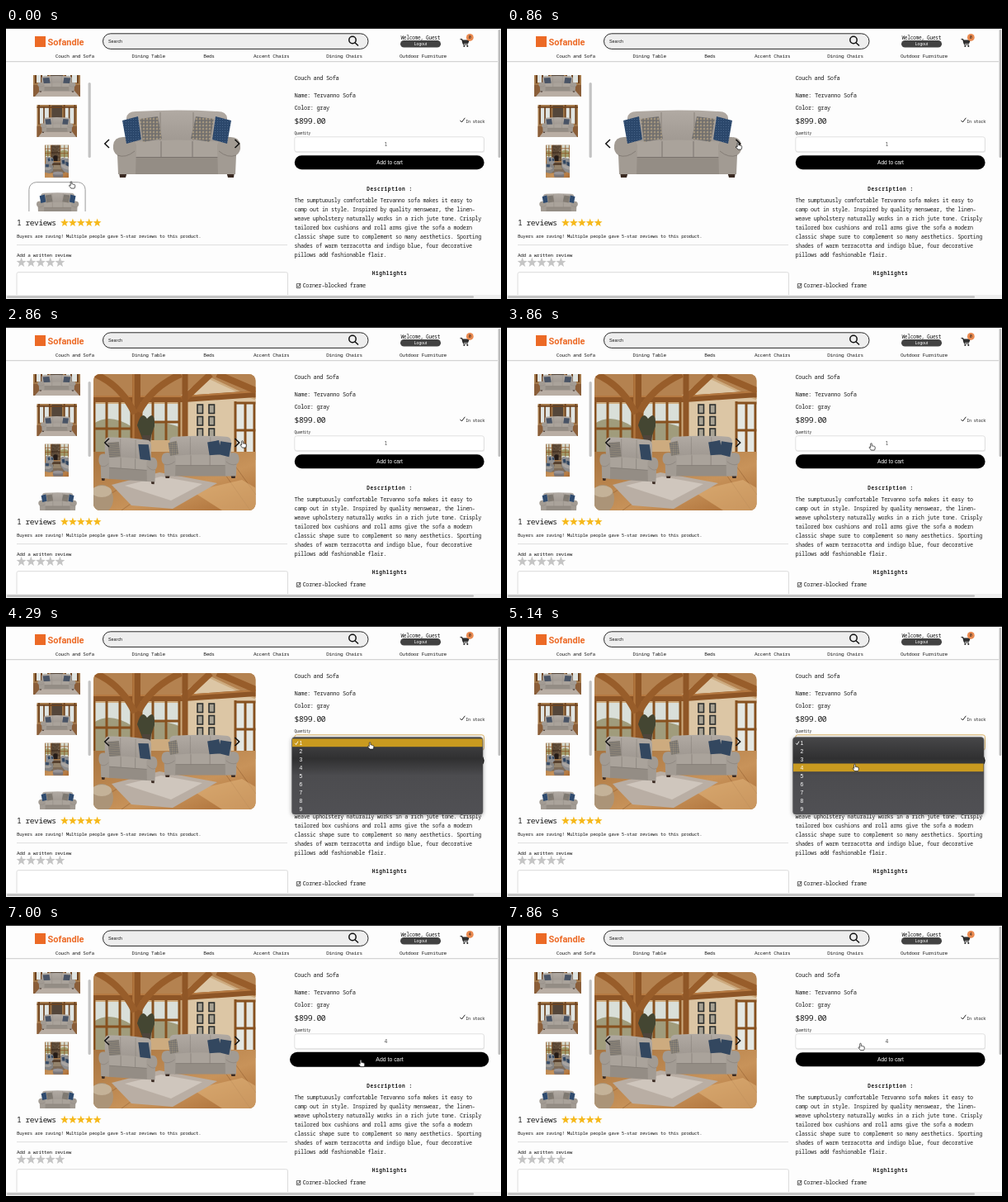
Animation of 600x328 px, one loop 8000 ms. Source, as an HTML page:

```html
<!DOCTYPE html>
<html lang="en">
<head>
<meta charset="utf-8">
<title>Furniture shop</title>
<style>
  html, body { margin: 0; width: 100%; height: 100%; overflow: hidden; background: #fdfdfd; }
  svg { display: block; width: 600px; height: 328px; }
  text { font-family: "Noto Sans Mono", "DejaVu Sans Mono", monospace; letter-spacing: -.05em; fill: #1c1c1c; }
  .ui { font-family: "Liberation Sans", Arial, sans-serif; letter-spacing: 0; }
  .head { font-weight: 600; letter-spacing: .1em; text-anchor: middle; }
  .brand { font-family: Roboto, sans-serif; font-weight: 700; letter-spacing: 0; fill: #ec6a26; }
  .light { fill: #fff; }
  #menu { filter: drop-shadow(0 1px 2.5px rgba(0, 0, 0, .35)); }
</style>
</head>
<body>
<svg id="stage" viewBox="0 0 600 328">
  <defs>
    <clipPath id="thumbClip"><rect x="26" y="57" width="74" height="165"/></clipPath>
    <clipPath id="roomClip"><rect width="196.5" height="165" rx="8"/></clipPath>
    <clipPath id="tallClip"><rect width="98.5" height="165"/></clipPath>
    <linearGradient id="menuFill" x2="0" y2="1">
      <stop offset="0" stop-color="#474749"/><stop offset=".28" stop-color="#303031"/>
      <stop offset=".5" stop-color="#4c4c4f"/><stop offset="1" stop-color="#505054"/>
    </linearGradient>
    <linearGradient id="floor" x2="1" y2="1">
      <stop offset="0" stop-color="#a8743f"/><stop offset=".6" stop-color="#c8935a"/><stop offset="1" stop-color="#a96b34"/>
    </linearGradient>
    <linearGradient id="cloth" x2="0" y2="1">
      <stop offset="0" stop-color="#b1aaa3"/><stop offset="1" stop-color="#968f88"/>
    </linearGradient>
    <pattern id="weave" width="4" height="4" patternUnits="userSpaceOnUse">
      <rect width="4" height="4" fill="#77736f"/><circle cx="2" cy="2" r="1.2" fill="#a3967f"/><circle r=".8" fill="#4c596b"/>
    </pattern>
    <pattern id="dots" width="3" height="3" patternUnits="userSpaceOnUse">
      <rect width="3" height="3" fill="#2b476b"/><circle cx="1.5" cy="1.5" r=".6" fill="#4c698d"/>
    </pattern>

    <g id="couch">
      <path d="M8 74h10l-2 7h-7zM138 74h10l-1 7h-7z" fill="#3a2a22"/>
      <path d="M17 9Q18 1 28 1Q78-2 128 1Q138 1 139 9V60H17z" fill="url(#cloth)"/>
      <path d="M58 2V38M98 2V38" stroke="#807a73" stroke-width=".8"/>
      <path d="M22 38Q78 33 134 38V58H22z" fill="#aaa39b"/>
      <path d="M26 56H130V77H26z" fill="#948d85"/>
      <path d="M26 56.5H130M59 37V56M97 37V56" stroke="#78716b" stroke-width=".9"/>
      <path d="M1 42Q2 31 15 32Q28 33 29 43L28 77H7L6 54Q0 50 1 42z" fill="#a29b93"/>
      <path d="M155 42Q154 31 141 32Q128 33 127 43L128 77H149L150 54Q156 50 155 42z" fill="#a29b93"/>
      <path d="M6 54Q16 58 27 49M150 54Q140 58 129 49" fill="none" stroke="#7e7770" stroke-width=".8"/>
    </g>
    <g id="sofa">
      <use href="#couch"/>
      <path d="M12 12L31 7L35 35L17 40z" fill="url(#dots)"/>
      <path d="M144 12L125 7L121 35L139 40z" fill="url(#dots)"/>
      <path d="M33 10L55 7L60 34L37 38z" fill="url(#weave)"/>
      <path d="M123 10L101 7L95 34L118 38z" fill="url(#weave)"/>
    </g>

    <g id="tall" clip-path="url(#tallClip)">
      <rect width="99" height="165" fill="#a87a47"/>
      <path d="M2 0H24V62H2zM65 0H99V68H65z" fill="#d5d9cd"/>
      <path d="M2 30Q12 22 24 34V56H2zM65 32Q82 18 99 36V60H65z" fill="#a09c6c"/>
      <path d="M1 0V62M13 0V60M25 0V64M64 0V66M81 0V66M97 0V66M0 20H25M64 18H99M0 42H25M64 42H99" stroke="#8e5727" stroke-width="3"/>
      <path d="M27 0H62L64 84H25z" fill="#5c4936"/>
      <g id="stones"/>
      <path d="M26 37H63V41H26z" fill="#3a2718"/>
      <path d="M35 82V57Q44 48 53 57V82z" fill="#241b17"/>
      <path d="M0 82H99V165H0z" fill="url(#floor)"/>
      <path d="M26 86H66L84 141H16z" fill="#7d6b59"/>
      <path d="M30 96H62L68 122H26z" fill="#94836c"/>
      <path d="M4 64Q5 59 12 60L29 62Q35 64 35 72L37 96L22 101L4 92z" fill="#919192"/>
      <path d="M12 68L20 65L23 80L14 83zM26 68L33 67L34 80L28 82z" fill="#354b67"/>
      <path d="M33 91H66L69 101H30z" fill="#4b3423"/><path d="M34 101V112M66 101V112" stroke="#352418" stroke-width="2"/>
      <path d="M0 95Q10 90 20 95L34 105V130L20 143L0 138z" fill="#848383"/>
      <path d="M0 112L18 110L30 117L17 127L0 125z" fill="#a39f9b"/><path d="M4 97L17 99L16 112L4 111z" fill="#364c68"/>
      <path d="M65 72Q68 62 78 65L99 71V142L80 134L66 113z" fill="#8d8d8f"/>
      <path d="M67 96L82 102L99 110V126L80 119L67 108z" fill="#a8a4a1"/>
      <path d="M70 78L81 76L84 94L73 95zM86 84L98 88V108L87 102z" fill="#324761"/>
      <path d="M36 137Q54 131 73 137L76 150L74 163H36L33 150z" fill="#79767a"/><path d="M36 137Q54 131 73 137L75 147Q54 152 34 147z" fill="#979396"/>
    </g>

    <g id="room" clip-path="url(#roomClip)">
      <rect width="197" height="165" fill="#cdab7f"/>
      <path d="M0 0H197V30L138 2L100 30H0z" fill="#b48250"/>
      <path d="M112 34L140 6L197 32V96H112z" fill="#dcc6a5"/>
      <path d="M0 36H47V98H0zM57 36H104V80H57z" fill="#d9dfd9"/>
      <path d="M0 60Q20 46 47 64V98H0zM57 62Q80 54 104 64V80H57z" fill="#a09c7c"/>
      <path d="M172 34H197V104H172z" fill="#e4e7e2"/>
      <path d="M1 34V96M16 34V96M32 34V96M46 34V96M58 36V80M72 34V80M88 34V80M104 32V82M172 33V106M184 34V104M195 34V104M0 66H47M57 58H104M172 68H197M0 97H47M172 35H197" stroke="#87511f" stroke-width="3"/>
      <path d="M0 94H197V165H0z" fill="url(#floor)"/>
      <path d="M0 158L75 111M34 165L110 110M190 165L160 122M197 146L168 106" stroke="#8a592c" stroke-width=".8" opacity=".6"/>
      <path d="M156 165L120 142L180 128L197 138V165z" fill="#e0b27b" opacity=".6"/>
      <path d="M0 30H110L197 24" fill="none" stroke="#8d5526" stroke-width="8"/>
      <path d="M0 27H110L197 21" fill="none" stroke="#b67a42" stroke-width="2"/>
      <path d="M52 0V100" stroke="#8f5626" stroke-width="10"/>
      <path d="M48.5 0V100" stroke="#b1763e" stroke-width="2.4"/>
      <path d="M2 0Q34 14 50 48M55 46Q70 16 106 0M108 32L142 0M150 0L197 20" fill="none" stroke="#985d2a" stroke-width="8"/>
      <path d="M111 0V80" stroke="#8f5626" stroke-width="7"/>
      <g id="frames"/>
      <path d="M53 62Q58 43 65 54Q75 43 74 63L68 80H60z" fill="#444632"/><path d="M59 74H70L68 92H61z" fill="#4e443b"/>
      <path d="M22 134L80 119L150 132L96 163L46 159z" fill="#b9aea4"/>
      <path d="M38 135L82 124L132 133L94 153z" fill="#cfc6bd"/>
      <g transform="translate(6 75) skewY(4) scale(.46 .66)">
        <use href="#couch"/>
        <path d="M24 11L54 8L58 35L29 38z" fill="url(#weave)"/><path d="M105 10L132 9L138 38L110 37z" fill="#33475f"/>
      </g>
      <g transform="translate(82 75) scale(.61 .63)">
        <use href="#couch"/>
        <path d="M14 13L31 9L35 35L18 38z" fill="url(#weave)"/><path d="M92 12L115 8L120 35L96 37zM118 10L140 13L135 40L114 35z" fill="#33475f"/>
      </g>
      <ellipse cx="10" cy="151" rx="14" ry="17" fill="#ab9478"/><ellipse cx="10" cy="142" rx="12" ry="7" fill="#c4b298"/>
    </g>

    <g id="lounge">
      <rect width="57" height="41" fill="#a57b4d"/>
      <path d="M4 2H17V24H4zM40 2H53V24H40z" fill="#dfe4e2"/>
      <path d="M21 1H36V22H21z" fill="#54463a"/>
      <path d="M3 0V25M10 2V24M18 0V25M39 0V25M46 2V24M54 0V25M0 3H57" stroke="#6e431f" stroke-width="2"/>
      <path d="M0 27H57V41H0z" fill="#8a5e39"/><path d="M8 34H50L56 41H2z" fill="#b9aea4"/>
      <g transform="translate(5 16) scale(.3 .24)">
        <use href="#couch"/>
        <path d="M22 10L48 8L52 36L26 38zM134 10L108 8L104 36L130 38z" fill="#485365"/>
      </g>
    </g>
  </defs>

  <rect width="600" height="328" fill="#fdfdfd"/>
  <rect width="600" height="1" fill="#222"/>
  <rect x="35" y="10" width="13" height="13" fill="#ec6a26"/>
  <rect x="117.5" y="6.8" width="321.5" height="18.6" rx="9.3" fill="#eee" stroke="#2a2a2a"/>
  <g fill="none" stroke="#111" stroke-width="1.5"><circle cx="420" cy="14.5" r="4.2"/><path d="M423 17.8L427 21.5"/></g>
  <rect x="478" y="15" width="49" height="8.6" rx="4.3" fill="#424242"/>
  <g fill="none" stroke="#222" stroke-width="1.1"><path d="M550.5 13.5H552.6L554.5 20H560"/><path d="M553.2 15H561L559.8 18.3H554.2z" fill="#333"/></g>
  <circle cx="555.3" cy="21.9" r="1" fill="#222"/><circle cx="559.3" cy="21.9" r="1" fill="#222"/>
  <circle cx="562.3" cy="11.4" r="4.4" fill="#e9894f"/>
  <path d="M0 40.7H596" stroke="#c6c6c6" stroke-width=".9"/>
  <rect x="596.6" y="2" width="2.6" height="155" rx="1.3" fill="#bcbcbc"/>

  <g clip-path="url(#thumbClip)">
    <use href="#lounge" transform="translate(33 42)"/>
    <use href="#lounge" transform="translate(37.5 93) scale(.85 .95)"/>
    <use href="#tall" transform="translate(47 141.5) scale(.294 .241)"/>
    <g id="pick">
      <rect id="pickRing" x="31" y="189" width="62" height="46" rx="8" fill="#fff" stroke="#9a9a9a" stroke-width=".9"/>
      <use href="#sofa" transform="translate(39 200.5) scale(.302 .29)"/>
    </g>
  </g>
  <rect x="99.6" y="66" width="3.2" height="91" rx="1.6" fill="#c3c3c3"/>

  <use id="view0" href="#sofa" transform="translate(129 100)"/>
  <use id="view1" href="#tall" transform="translate(155 57)"/>
  <use id="view2" href="#room" transform="translate(106 57)"/>
  <path d="M125 135L119.8 140L125 145M277.5 135L282.7 140L277.5 145" fill="none" stroke="#111" stroke-width="1.5"/>

  <path d="M13 262.6H341" stroke="#d6d6d6" stroke-width=".8"/>
  <rect x="13" y="295.7" width="328.5" height="40" rx="2" fill="#fff" stroke="#d8d8d8" stroke-width=".9"/>
  <path d="M550.5 111.8L552.4 114L556.3 108.8" fill="none" stroke="#222" stroke-width="1"/>
  <rect x="350" y="132.4" width="230" height="18.4" rx="2.5" fill="#e6e6e6"/>
  <rect id="field" x="349.8" y="131.8" width="229.6" height="18" rx="2.5" fill="#fff" stroke="#dadada" stroke-width=".8"/>
  <text id="qty" x="460.3" y="143" font-size="6.5" text-anchor="middle" style="fill:#555">1</text>
  <g id="buy">
    <rect x="349.8" y="154.2" width="229.8" height="17" rx="8.5"/>
    <text class="ui light" x="465" y="165" font-size="6.6" text-anchor="middle">Add to cart</text>
  </g>
  <path d="M352.3 309.6H356.8V314.6H352.3zM353 311.8L354.3 313.4L357 309" fill="none" stroke="#222" stroke-width=".7"/>
  <g id="copy"/>
  <text id="count" x="562.3" y="13.3" font-size="5.2" text-anchor="middle">0</text>
  <rect y="323" width="600" height="5" fill="#efefef"/>
  <rect x="1" y="324.2" width="566" height="2.5" rx="1.2" fill="#bdbdbd"/>

  <g id="menu">
    <rect x="346.5" y="134.5" width="231.5" height="93.5" rx="3.5" fill="url(#menuFill)" stroke="#666" stroke-width=".5"/>
    <rect id="bar" x="347" width="230.5" height="9.7" fill="#c99a1f"/>
    <path d="M350.3 141.8L351.6 143.6L354 139.6" fill="none" stroke="#fff" stroke-width=".9"/>
    <g id="options"/>
  </g>

  <path id="hand" d="M-.9 .8Q-.9 -.3 0 -.3T.9 .8V3.2Q1.8 2.6 2.4 3.5Q3.3 3 3.9 3.9Q5 3.6 5.1 4.8V6.4Q5 7.7 4.2 8.8H-.1Q-1 7.5 -2.6 5.6Q-2.9 4.5 -1.7 4.6L-.9 5.3z" fill="#fff" stroke="#111" stroke-width=".75"/>
</svg>
<script>
const $ = id => document.getElementById(id);

function add(parent, tag, attrs, text) {
  const el = document.createElementNS('http://www.w3.org/2000/svg', tag);
  for (const k in attrs) el.setAttribute(k, attrs[k]);
  if (text) el.textContent = text;
  parent.append(el);
  return el;
}
function label(x, y, size, text, more) {
  add($('copy'), 'text', { x, y, 'font-size': size, ...more }, text);
}
const mid = { 'text-anchor': 'middle' };
const head = { class: 'head' };

label(50.5, 20.5, 11, 'Sofandle', { class: 'brand' });
label(124, 18, 5.4, 'Search', { class: 'ui' });
label(502.3, 14.2, 6.2, 'Welcome, Guest', mid);
label(502.5, 21.2, 5, 'Logout', { ...mid, class: 'ui light' });
[[83.3, 'Couch and Sofa'], [172.7, 'Dining Table'], [246, 'Beds'], [321.7, 'Accent Chairs'],
 [410, 'Dining Chairs'], [505.5, 'Outdoor Furniture']].forEach(([x, s]) => label(x, 36.4, 6.1, s, mid));
label(349.5, 63, 7, 'Couch and Sofa');
label(349.5, 84, 7.1, 'Name: Tervanno Sofa');
label(349.5, 98.6, 7, 'Color: gray');
label(349.5, 116, 9.8, '$899.00');
label(580, 114.8, 5.2, 'In stock', { 'text-anchor': 'end' });
label(349.5, 129, 4.4, 'Quantity');
label(465, 197.2, 6.1, 'Description :', head);
['The sumptuously comfortable Tervanno sofa makes it easy to',
 'camp out in style. Inspired by quality menswear, the linen-',
 'weave upholstery naturally works in a rich jute tone. Crisply',
 'tailored box cushions and roll arms give the sofa a modern',
 'classic shape sure to complement so many aesthetics. Sporting',
 'shades of warm terracotta and indigo blue, four decorative',
 'pillows add fashionable flair.'
].forEach((s, i) => label(349.5, 211 + i * 11.05, 6.76, s));
label(465, 298.6, 6.1, 'Highlights', head);
label(359.5, 314.3, 6.95, 'Corner-blocked frame');
label(13, 239, 9.6, '1 reviews');
label(13, 254.4, 5.72, 'Buyers are raving! Multiple people gave 5-star reviews to this product.');
label(13, 277, 6, 'Add a written review');

function star(cx, cy, r, fill) {
  const pts = Array.from({ length: 10 }, (_, i) => {
    const a = i * Math.PI / 5, d = i % 2 ? r * .42 : r;
    return (cx + d * Math.sin(a)).toFixed(2) + ',' + (cy - d * Math.cos(a)).toFixed(2);
  });
  add($('copy'), 'polygon', { points: pts.join(' '), fill });
}
for (let i = 0; i < 5; i++) {
  star(71 + i * 9.9, 235.8, 5.2, '#f6b91c');
  star(18.6 + i * 11.7, 283.9, 6.2, '#c5c5c5');
}

let seed = 7;
const rnd = () => (seed = seed * 16807 % 2147483647) / 2147483647;
for (let i = 0; i < 60; i++) {
  add($('stones'), 'ellipse', {
    cx: 29 + rnd() * 31, cy: rnd() * 80, rx: 1.5 + rnd() * 2, ry: 1 + rnd() * 1.3,
    fill: ['#7c674f', '#4b3a29', '#8f7a61', '#665546'][i % 4]
  });
}
for (let i = 0; i < 6; i++) {
  add($('frames'), 'rect', {
    x: 126 + i % 2 * 14, y: 37 + (i >> 1) * 14.5, width: 6.5, height: 10.5,
    fill: '#a8a293', stroke: '#2d302f', 'stroke-width': 1.6
  });
}
for (let i = 0; i < 9; i++) {
  add($('options'), 'text', { x: 355.6, y: 144.1 + i * 10, 'font-size': 6.8, class: 'ui light' }, i + 1);
}

// time, pointer x, pointer y
const path = [
  [0, 79, 186], [140, 79, 186], [860, 280, 139], [1710, 282.5, 138], [2570, 282.5, 138],
  [2860, 286.5, 138], [3430, 439, 140], [3860, 441.5, 141], [4430, 441, 141],
  [5000, 421.5, 167.5], [5710, 421.5, 167.5], [6290, 430, 163.5], [7140, 430, 163.5],
  [7570, 428.5, 143.5], [8000, 428.5, 143.5]
];
const ramp = (t, a, b) => {
  const u = Math.min(1, Math.max(0, (t - a) / (b - a)));
  return u * u * (3 - 2 * u);
};
function pointer(t) {
  let i = 1;
  while (i < path.length - 1 && t > path[i][0]) i++;
  const [a, x0, y0] = path[i - 1], [b, x1, y1] = path[i], u = ramp(t, a, b);
  return [x0 + (x1 - x0) * u, y0 + (y1 - y0) * u];
}
const show = (id, on) => $(id).setAttribute('opacity', +on);
const grow = (id, s, x, y) =>
  $(id).setAttribute('transform', `translate(${x} ${y}) scale(${s}) translate(${-x} ${-y})`);

function draw(t) {
  const [x, y] = pointer(t);
  $('hand').setAttribute('transform', `translate(${x} ${y}) scale(.92)`);

  const hover = 1 - ramp(t, 140, 430);
  show('pickRing', hover);
  grow('pick', 1 + .1 * hover, 62, 212);

  const view = t < 1425 ? 0 : t < 2285 ? 1 : 2;
  for (let i = 0; i < 3; i++) show('view' + i, i === view);

  const open = t >= 4280 ? 1 - ramp(t, 5420, 5720) : 0;
  show('menu', open);
  const row = Math.max(0, Math.min(8, Math.floor((y - 136.5) / 10)));
  $('bar').setAttribute('y', 136.5 + row * 10);
  $('field').setAttribute('stroke', open ? '#d9a441' : '#dadada');
  $('qty').textContent = t < 5565 ? 1 : 4;

  grow('buy', 1 + .05 * (ramp(t, 5420, 5860) - ramp(t, 7280, 7580)), 465, 162.7);
  $('count').textContent = t < 6850 ? 0 : 4;
}

// seven poses per second, as in a screen recording
const LOOP = 8000, STEP = 1000 / 7, start = performance.now();
function tick() {
  const t = (performance.now() - start) % LOOP;
  draw(Math.floor((t + 5) / STEP) * STEP % LOOP);
  requestAnimationFrame(tick);
}
tick();
</script>
</body>
</html>
```
